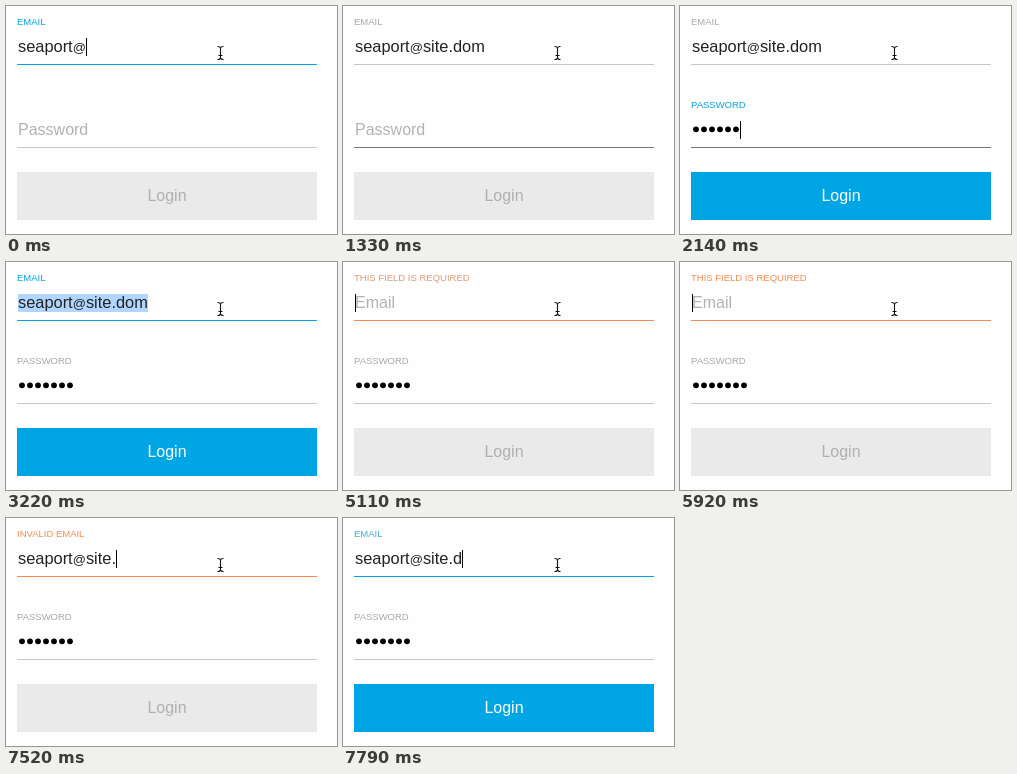
Write an HTML page that moves like this. It is 331 px wide and 228 px high and loops after 8000 ms.

```html
<!DOCTYPE html>
<html lang="en">
<head>
<meta charset="utf-8">
<title>Login form</title>
<style>
  html, body { margin: 0; width: 100%; height: 100%; overflow: hidden; background: #fefefe; }
  svg { display: block; width: 331px; height: 228px; font: 16px "Liberation Sans", Arial, sans-serif; }
  .label { font-size: 9.5px; }
  .value { font-size: 16.4px; fill: #222; }
  .at { font-size: 13px; }
  .hint { fill: #b2b2b2; }
</style>
</head>
<body>
<svg viewBox="0 0 331 228">
  <rect width="331" height="228" fill="#fefefe"/>

  <text id="emailLabel" class="label" x="11" y="19"></text>
  <rect id="selection" x="12" y="32" width="130" height="18" fill="#b2d5fd"/>
  <text id="emailHint" class="hint" x="12" y="46">Email</text>
  <text id="email" class="value" x="12" y="46"><tspan id="user"></tspan><tspan id="at" class="at"></tspan><tspan id="domain"></tspan></text>
  <rect id="emailLine" x="11" y="58" width="300" height="1"/>

  <text id="passLabel" class="label" x="11">PASSWORD</text>
  <text id="passHint" class="hint" x="12" y="129">Password</text>
  <g id="dots"></g>
  <rect id="passLine" x="11" y="141" width="300" height="1"/>

  <rect id="caret" width="1" height="18"/>

  <rect id="button" x="11" y="166" width="300" height="48"/>
  <text id="login" x="161" y="195" text-anchor="middle">Login</text>

  <g fill="none" stroke-linecap="square">
    <path id="beamHalo" stroke="#fff" stroke-width="3"/>
    <path id="beam" stroke="#111" stroke-width="1.1"/>
  </g>
</svg>
<script>
const LOOP = 8000;
const ADDRESS = "seaport@site.dom";
const BLUE = "#00a6e4", ORANGE = "#f58b4e", GREY = "#a8a8a8", RULE = "#c6c6c6", DARK = "#777";
const DOT_STEP = 8, MAX_DOTS = 7;

const $ = id => document.getElementById(id);
const paint = (id, color) => $(id).setAttribute("fill", color);
const show = (id, on) => $(id).setAttribute("visibility", on ? "visible" : "hidden");

// Each step lists only what changes at its time (ms).
const steps = [
  [0, { typed: 8, label: "EMAIL", labelColor: BLUE, line: BLUE, selected: false,
        dots: 0, passColor: "none", passY: 102, passLine: RULE, caret: "email", ready: false }],
  [270, { typed: 10 }],
  [530, { typed: 13 }],
  [800, { typed: 16, line: RULE, passLine: DARK, caret: "pass" }],
  [1060, { labelColor: GREY }],
  [1330, { caret: "" }],
  [1600, { dots: 2, caret: "pass", passColor: "#b5dfee", passY: 105 }],
  [1870, { dots: 4, passColor: BLUE, passY: 102 }],
  [2140, { dots: 6, ready: true }],
  [2410, { dots: 7 }],
  [2950, { caret: "", selected: true, line: BLUE, passLine: RULE, labelColor: "#55a8c6", passColor: "#55a8c6" }],
  [3220, { labelColor: BLUE, passColor: GREY }],
  [5110, { typed: 0, selected: false, caret: "email", label: "THIS FIELD IS REQUIRED",
           labelColor: "#d99a78", line: ORANGE, ready: false }],
  [5380, { labelColor: ORANGE }],
  [5650, { caret: "" }],
  [5920, { caret: "email" }],
  [6190, { typed: 3, label: "INVALID EMAIL" }],
  [6450, { typed: 5 }],
  [6720, { typed: 7 }],
  [6990, { typed: 8 }],
  [7250, { typed: 9 }],
  [7520, { typed: 13 }],
  [7790, { typed: 14, label: "EMAIL", labelColor: "#45acca", line: BLUE, ready: true }]
];

const stateAt = time =>
  Object.assign({}, ...steps.filter(([start]) => start <= time).map(([, change]) => change));

for (let i = 0; i < MAX_DOTS; i++) {
  const dot = document.createElementNS("http://www.w3.org/2000/svg", "circle");
  dot.setAttribute("cx", 16 + i * DOT_STEP);
  dot.setAttribute("cy", 123.3);
  dot.setAttribute("r", 2.9);
  $("dots").append(dot);
}

const beamPath = "M212 40.5q2 0 2.5 1.5q.5-1.5 2.5-1.5M214.5 42V52M212 53.5q2 0 2.5-1.5q.5 1.5 2.5 1.5M213 49.5h3";
for (const id of ["beamHalo", "beam"]) $(id).setAttribute("d", beamPath);

function drawCaret(field, typed, dots) {
  const textWidth = typed ? $("email").getComputedTextLength() : 0;
  const offset = field === "email" ? textWidth : dots * DOT_STEP;
  $("caret").setAttribute("x", Math.round(12 + offset));
  $("caret").setAttribute("y", field === "email" ? 32 : 115);
  show("caret", field);
}

function draw(time) {
  const s = stateAt(time);
  const text = ADDRESS.slice(0, s.typed);
  $("user").textContent = text.slice(0, 7);
  $("at").textContent = text.slice(7, 8);
  $("domain").textContent = text.slice(8);
  $("emailLabel").textContent = s.label;
  paint("emailLabel", s.labelColor);
  paint("emailLine", s.line);
  show("emailHint", !s.typed);
  show("selection", s.selected);

  $("passLabel").setAttribute("y", s.passY);
  paint("passLabel", s.passColor);
  paint("passLine", s.passLine);
  show("passHint", !s.dots);
  [...$("dots").children].forEach((dot, i) =>
    dot.setAttribute("visibility", i < s.dots ? "visible" : "hidden"));

  paint("button", s.ready ? BLUE : "#eaeaea");
  paint("login", s.ready ? "#fff" : "#b0b0b0");
  drawCaret(s.caret, s.typed, s.dots);
}

const begin = performance.now();
function tick() {
  draw((performance.now() - begin) % LOOP);
  requestAnimationFrame(tick);
}
tick();
</script>
</body>
</html>
```
